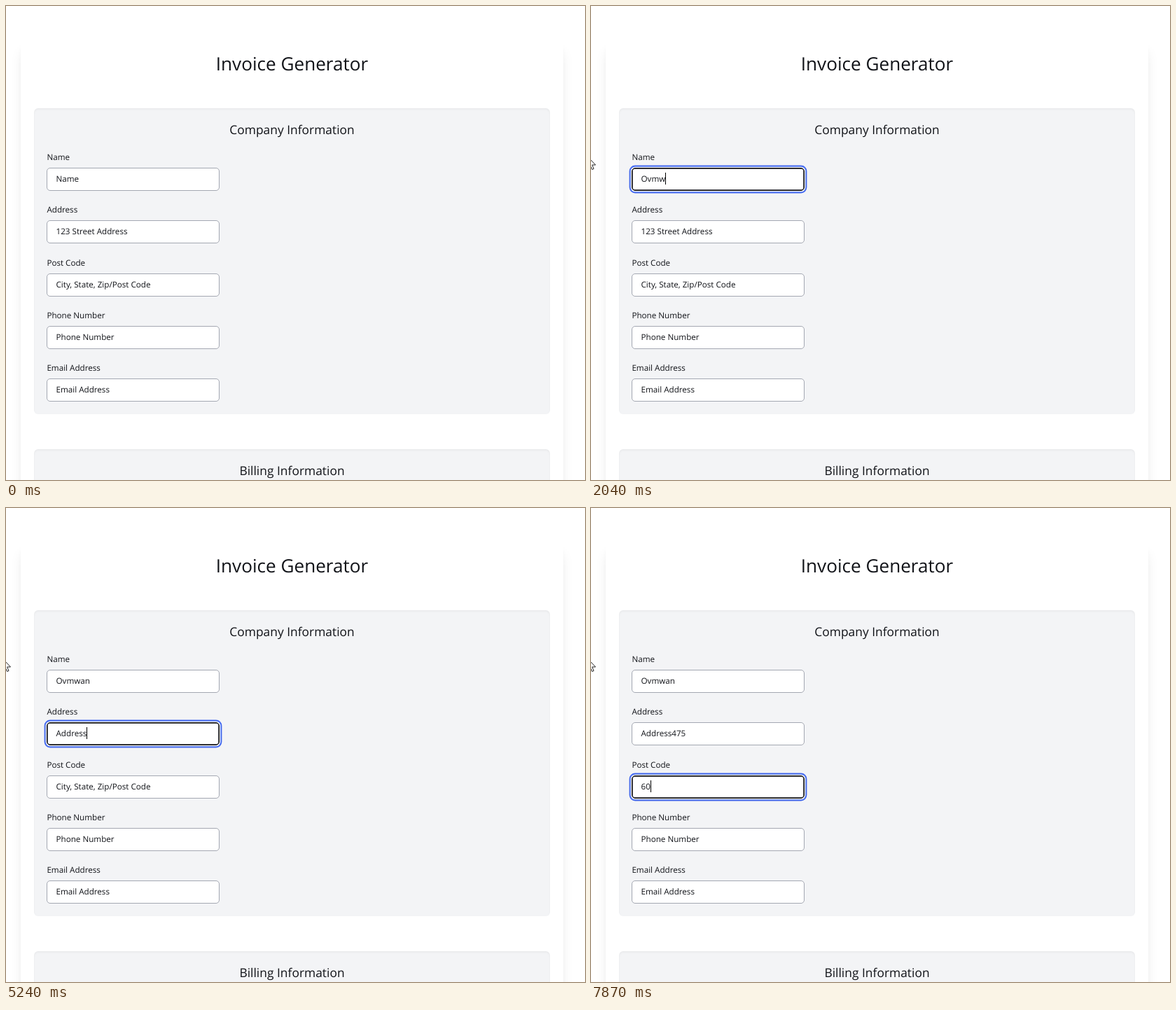
An HTML page that plays this animation: 827x677 px, repeating every 8 s.

```html
<!DOCTYPE html>
<html lang="en">
<head>
<meta charset="utf-8">
<title>Invoice Generator</title>
<style>
  html, body { margin: 0; width: 100%; height: 100%; overflow: hidden; background: #fff; }
  body {
    position: relative;
    font: 11.65px/20px "Open Sans", "Noto Sans", sans-serif;
    color: #111318;
    text-rendering: geometricPrecision;
  }
  .card, .panel, .label, .field, h1, h2, #mouse { position: absolute; margin: 0; box-sizing: border-box; white-space: pre; }
  .card {
    left: 21px; top: 48px; width: 775px; height: 900px; border-radius: 6px; background: #fff;
    box-shadow: 0 15px 19px -4px rgba(0, 0, 0, .1), 0 6px 8px -5px rgba(0, 0, 0, .1);
  }
  .panel {
    left: 40px; width: 737px; height: 437px; border-radius: 6px; background: #f3f4f6;
    box-shadow: inset 0 1.5px 3px rgba(0, 0, 0, .05);
  }
  h1, h2 { left: 40px; width: 737px; text-align: center; font-weight: 400; }
  h1 { top: 62px; font-size: 26.15px; line-height: 40px; }
  h2 { font-size: 17.4px; line-height: 30px; }
  .label { left: 58.4px; }
  .field {
    left: 58px; width: 246.5px; height: 33px; padding-left: 12.5px; line-height: 31px;
    border: 1px solid #a4a8b2; border-radius: 5px; background: #fff;
  }
  .field.focus {
    border-color: #101014;
    box-shadow: inset 0 0 0 .7px #101014, 0 0 0 1.3px #fff, 0 0 0 3.4px #486df0;
  }
  .sel { padding: 1.5px 0; background: #574bcf; color: #fff; }
  .caret { display: inline-block; width: 1px; height: 17px; margin-right: -1px; background: #000; vertical-align: -4px; }
  #mouse { left: 0; top: 0; overflow: visible; }
</style>
</head>
<body>
<div class="card"></div>
<h1>Invoice Generator</h1>
<div class="panel" style="top:146px"></div>
<h2 style="top:162px">Company Information</h2>
<div id="form"></div>
<div class="panel" style="top:633px"></div>
<h2 style="top:649px">Billing Information</h2>
<svg id="mouse" width="13" height="20">
  <path id="arrow" d="M.5 .5V16.5L4.2 13L6.6 18.5L9 17.5L6.6 12H11.5Z" fill="#fff" stroke="#222"/>
  <path id="beam" d="M-3 -8H-1L0 -7L1 -8H3M0 -7V7M-3 8H-1L0 7L1 8H3" fill="none" stroke="#222"/>
</svg>
<script>
const LOOP = 8000, PRESS = 425, RELEASE = 1170, CARET_OFF = 6700, TEXT_X = 71.5;

// Each field: label, placeholder, typed text, key times, focus time
const rows = [
  { label: "Name", hint: "Name", text: "Ovmwan", keys: [1560, 1740, 1870, 2040, 2140, 2300], focus: PRESS },
  { label: "Address", hint: "123 Street Address", text: "Address475",
    keys: [4080, 4240, 4440, 4670, 4870, 5080, 5240, 5760, 5990, 6160], focus: 2530 },
  { label: "Post Code", hint: "City, State, Zip/Post Code", text: "60", keys: [7640, 7870], focus: 6770 },
  { label: "Phone Number", hint: "Phone Number" },
  { label: "Email Address", hint: "Email Address" }
];

const $ = id => document.getElementById(id);
const ruler = document.createElement("canvas").getContext("2d");

function add(cls, top, text) {
  const el = document.createElement("div");
  el.className = cls;
  el.style.top = top + "px";
  el.textContent = text;
  $("form").append(el);
  return el;
}

rows.forEach((row, i) => {
  const top = Math.round(231 + 75.33 * i);
  add("label", top - 24.5, row.label);
  row.el = add("field", top, row.hint);
});

const mix = (a, b, k) => a + (b - a) * k;
const ease = k => k * k * (3 - 2 * k);

// The pointer comes down to the first field, then drags left past the edge.
function pointer(t) {
  const step = Math.min(710, 100 + Math.floor((t - 100) / 40.6) * 40.6);
  if (step < PRESS) {
    const k = ease((step - 100) / (PRESS - 100));
    return [mix(392, 150, k), mix(70, 248, k)];
  }
  const k = ease((step - PRESS) / (710 - PRESS));
  return [mix(150, -5, k), mix(248, 215, k)];
}

// Number of characters left of the drag point
function hitIndex(text, x) {
  ruler.font = getComputedStyle(document.body).font;
  let n = 0;
  while (n < text.length) {
    const left = ruler.measureText(text.slice(0, n)).width;
    const right = ruler.measureText(text.slice(0, n + 1)).width;
    if (TEXT_X + (left + right) / 2 > x) break;
    n++;
  }
  return n;
}

function drawField(row, i, t, x) {
  const next = rows[i + 1].focus || Infinity;
  const active = t >= row.focus && t < next;
  const count = row.keys.filter(k => t >= k).length;
  const value = count ? row.text.slice(0, count) : row.hint;
  let html = value;
  if (active) {
    const from = count ? value.length : i ? 0 : hitIndex(value, x);
    const tail = value.slice(from);
    const caret = t >= CARET_OFF && i === 1 ? "" : '<i class="caret"></i>';
    html = value.slice(0, from) + (tail ? `<span class="sel">${tail}</span>` : caret);
  }
  row.el.classList.toggle("focus", active);
  if (row.html !== html) row.el.innerHTML = row.html = html;
}

function render(t) {
  const [x, y] = pointer(t);
  const overField = x > 58 && x < 304 && y > 231 && y < 264;
  const beam = overField || (t >= PRESS && t < RELEASE);
  $("mouse").style.display = t < 100 ? "none" : "block";
  $("mouse").style.transform = `translate(${Math.round(x)}px, ${Math.round(y)}px)`;
  $("arrow").style.display = beam ? "none" : "inline";
  $("beam").style.display = beam ? "inline" : "none";
  rows.slice(0, 3).forEach((row, i) => drawField(row, i, t, x));
}

const start = performance.now();
function frame() {
  render((performance.now() - start) % LOOP);
  requestAnimationFrame(frame);
}
frame();
</script>
</body>
</html>
```
